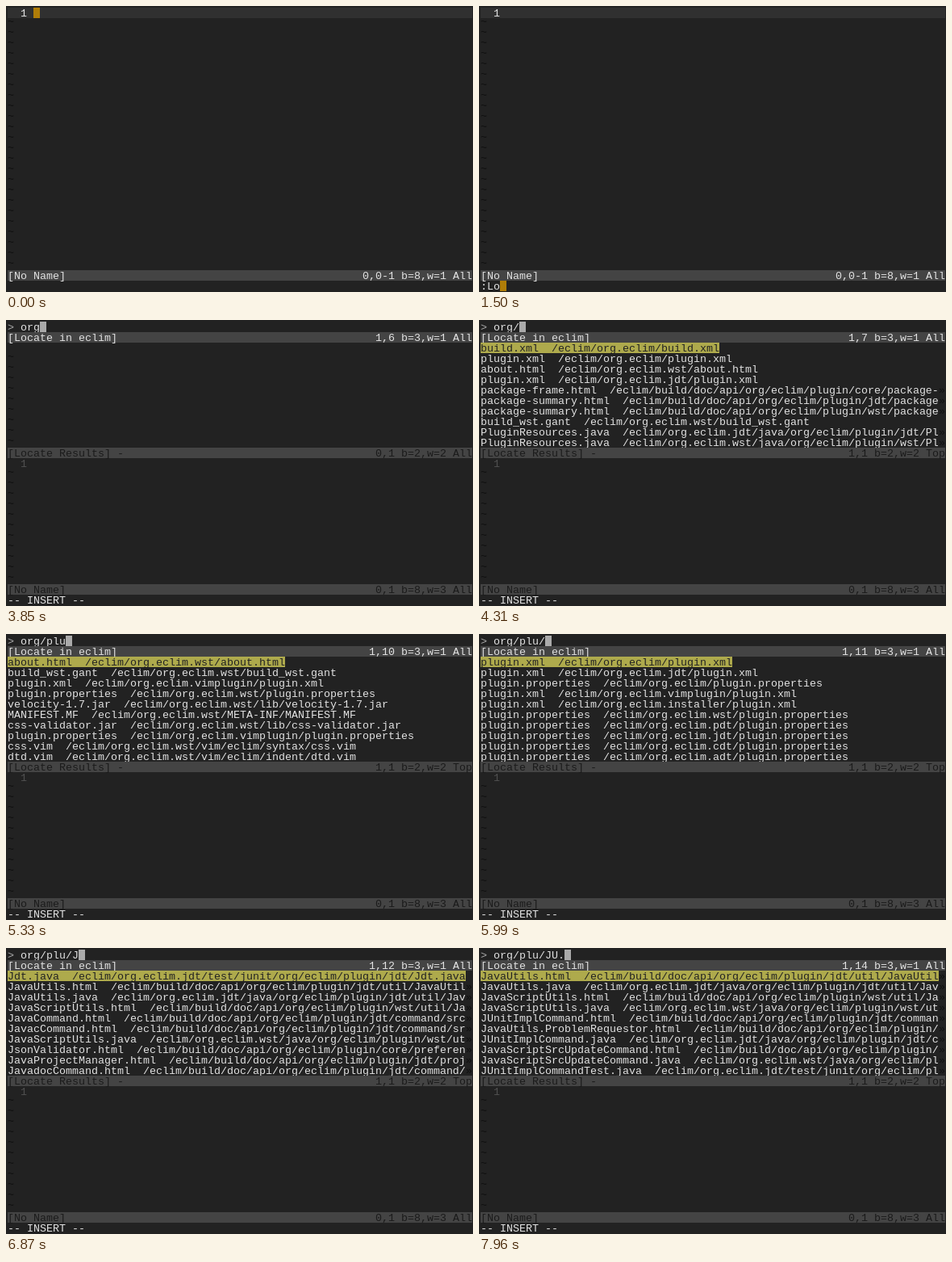
An HTML page with a canvas that plays this animation: 579x354 px, repeating every 8000 ms.

```html
<!DOCTYPE html>
<html lang="en">
<head>
<meta charset="utf-8">
<title>Locate file by fuzzy path</title>
<style>
html, body { margin: 0; height: 100%; overflow: hidden; background: #222; }
canvas { display: block; }
</style>
</head>
<body>
<canvas id="stage" width="579" height="354"></canvas>
<script>
const ctx = document.getElementById('stage').getContext('2d');
const LOOP = 8000, CW = 8, RH = 13, PAD = 2, COLS = 72;
const BG = '#222222', LINE = '#303030', BAR = '#444444', FG = '#e2e2e2';
const DARK = '#1b1b1b', MARK = '#101010', DIM = '#505050', GREY = '#aaaaaa';
const ORANGE = '#b07d08', OLIVE = '#aeaa4c';

// Each key press: [time, character]
const COMMAND = [[770, ':'], [1190, 'L'], [1410, 'o'], [1510, 'c'], [1600, 'a'], [1700, 't'],
  [1800, 'e'], [2050, 'F'], [2200, 'i'], [2265, 'l'], [2330, 'e']];
const QUERY = [[3590, 'o'], [3660, 'r'], [3850, 'g'], [4310, '/'], [4870, 'p'], [5100, 'l'],
  [5330, 'u'], [5990, '/'], [6460, 'J'], [7160, 'U'], [7960, '.']];

const API = 'build/doc/api/org/eclim/plugin/';
const JDT = 'org.eclim.jdt/java/org/eclim/plugin/jdt/';
const WST = 'org.eclim.wst/java/org/eclim/plugin/wst/';
const UTILS = [API + 'jdt/util/JavaUtils.html', JDT + 'util/JavaUtils.java',
  API + 'wst/util/JavaScriptUtils.html', WST + 'util/JavaScriptUtils.java'];
const props = name => `org.eclim.${name}/plugin.properties`;

// Result lists: [time shown, paths below /eclim/]
const RESULTS = [
  [4260, ['org.eclim/build.xml', 'org.eclim/plugin.xml', 'org.eclim.wst/about.html',
    'org.eclim.jdt/plugin.xml', API + 'core/package-frame.html', API + 'jdt/package-summary.html',
    API + 'wst/package-summary.html', 'org.eclim.wst/build_wst.gant',
    JDT + 'PluginResources.java', WST + 'PluginResources.java']],
  [4720, ['org.eclim.wst/about.html', 'org.eclim.wst/build_wst.gant',
    'org.eclim.vimplugin/plugin.xml', props('wst'), 'org.eclim.wst/lib/velocity-1.7.jar',
    'org.eclim.wst/META-INF/MANIFEST.MF', 'org.eclim.wst/lib/css-validator.jar',
    props('vimplugin'), 'org.eclim.wst/vim/eclim/syntax/css.vim',
    'org.eclim.wst/vim/eclim/indent/dtd.vim']],
  [5740, ['org.eclim/plugin.xml', 'org.eclim.jdt/plugin.xml', 'org.eclim/plugin.properties',
    'org.eclim.vimplugin/plugin.xml', 'org.eclim.installer/plugin.xml',
    ...['wst', 'pdt', 'jdt', 'cdt', 'adt'].map(props)]],
  [6420, ['org.eclim.vimplugin/plugin.xml', 'org.eclim.vimplugin/about.html',
    'org.eclim.vimplugin/build.properties', 'org.eclim.vimplugin/META-INF/MANIFEST.MF',
    API + 'Plugin.html', API + 'pdt/Pdt.html', API + 'jdt/Jdt.html', API + 'cdt/Cdt.html',
    API + 'adt/Adt.html', API + 'wst/Wst.html']],
  [6870, ['org.eclim.jdt/test/junit/org/eclim/plugin/jdt/Jdt.java', ...UTILS.slice(0, 3),
    API + 'jdt/command/src/JavaCommand.html', API + 'jdt/command/src/JavacCommand.html', UTILS[3],
    API + 'core/preference/JsonValidator.html', API + 'jdt/project/JavaProjectManager.html',
    API + 'jdt/command/doc/JavadocCommand.html']],
  [7560, [...UTILS, API + 'jdt/command/junit/JUnitImplCommand.html',
    API + 'jdt/util/JavaUtils.ProblemRequestor.html', JDT + 'command/junit/JUnitImplCommand.java',
    API + 'wst/command/JavaScriptSrcUpdateCommand.html',
    WST + 'command/JavaScriptSrcUpdateCommand.java',
    'org.eclim.jdt/test/junit/org/eclim/plugin/jdt/JUnitImplCommandTest.java']]
];

const typed = (keys, t) => keys.filter(k => k[0] <= t).map(k => k[1]).join('');

function fill(col, row, cols, color) {
  ctx.fillStyle = color;
  ctx.fillRect(PAD + col * CW, PAD + row * RH, cols * CW, RH);
}

function text(col, row, str, color = FG, base = 11) {
  ctx.fillStyle = color;
  ctx.fillText(str, PAD + col * CW, PAD + row * RH + base);
}

function status(row, left, right, color = DARK) {
  fill(0, row, COLS, BAR);
  text(0, row, left, color);
  text(COLS - right.length, row, right, color);
}

function tildes(from, to) {
  for (let row = from; row <= to; row++) text(0, row, '~', MARK, 8);
}

function drawResults(paths) {
  paths.forEach((path, i) => {
    const row = 2 + i;
    const line = `${path.split('/').pop()}  /eclim/${path}`;
    const shown = line.length > COLS ? line.slice(0, COLS - 1) : line;
    if (!i) fill(0, row, shown.length, OLIVE);
    text(0, row, shown, i ? FG : BG);
    if (shown !== line) text(COLS - 1, row, '»', MARK);
  });
}

function drawEditor(t) {
  fill(0, 0, COLS, LINE);
  text(2, 0, '1');
  tildes(1, 24);
  status(25, '[No Name]', '0,0-1 b=8,w=1 All', FG);
  const cmd = typed(COMMAND, t);
  text(0, 26, t < 2630 ? cmd : '"[Locate Results]" [New File]');
  if (!cmd) fill(4, 0, 1, ORANGE);
  else if (t < 2590) fill(cmd.length, 26, 1, ORANGE);
}

function drawLocate(t) {
  const query = typed(QUERY, t);
  const found = RESULTS.filter(r => r[0] <= t).pop();
  text(0, 0, '>', GREY);
  text(2, 0, query);
  fill(2 + query.length, 0, 1, GREY);
  status(1, '[Locate in eclim]', `1,${query.length + 3} b=3,w=1 All`, FG);
  if (found) drawResults(found[1]);
  else tildes(3, 11);
  status(12, '[Locate Results]' + (t < 2960 ? '' : ' -'),
    found ? '1,1 b=2,w=2 Top' : '0,1 b=2,w=2 All');
  text(2, 13, '1', DIM);
  tildes(14, 24);
  status(25, '[No Name]', '0,1 b=8,w=3 All');
  text(0, 26, '-- INSERT --');
}

function draw() {
  const t = performance.now() % LOOP;
  ctx.font = '13.333px "Liberation Mono", monospace';
  ctx.fillStyle = BG;
  ctx.fillRect(0, 0, 579, 354);
  (t < 2670 ? drawEditor : drawLocate)(t);
  requestAnimationFrame(draw);
}
draw();
</script>
</body>
</html>
```
